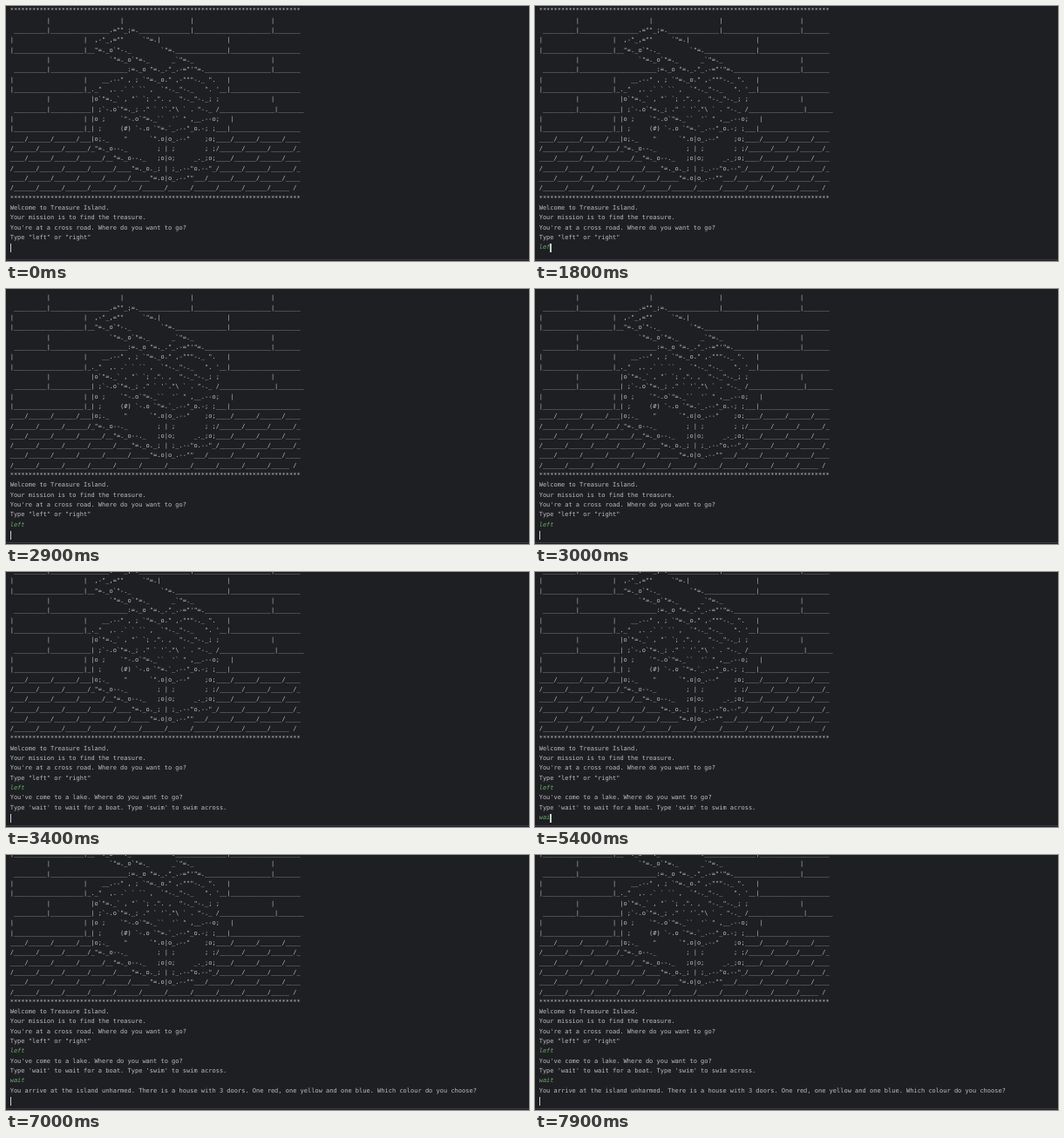
An HTML page for the animation above (8000 ms loop, 600x293 px).

```html
<!DOCTYPE html>
<html lang="en">
<head>
<meta charset="utf-8">
<title>Treasure Island</title>
<style>
  html, body { margin: 0; width: 100%; height: 100%; overflow: hidden; background: #1e1f22; }
  #stage { position: relative; width: 600px; height: 293px; overflow: hidden; }
  #console { position: absolute; left: 4.7px; top: 0.4px; }
  pre {
    margin: 0;
    font: 7px/11.33px "DejaVu Sans Mono", monospace;
    color: #bcbec4;
    text-rendering: geometricPrecision;
    font-variant-ligatures: none;
  }
  i { color: #6aab73; }
  #caret { position: absolute; width: 1.4px; height: 10px; background: #ced0d6; }
  #edge { position: absolute; left: 0; top: 291px; width: 600px; height: 1px; background: #393b40; }
</style>
</head>
<body>
<div id="stage">
  <div id="console">
<pre>
*******************************************************************************
          |                   |                  |                     |
 _________|________________.=""_;=.______________|_____________________|_______
|                   |  ,-"_,=""     `"=.|                  |
|___________________|__"=._o`"-._        `"=.______________|___________________
          |                `"=._o`"=._      _`"=._                     |
 _________|_____________________:=._o "=._."_.-="'"=.__________________|_______
|                   |    __.--" , ; `"=._o." ,-"""-._ ".   |
|___________________|_._"  ,. .` ` `` ,  `"-._"-._   ". '__|___________________
          |           |o`"=._` , "` `; .". ,  "-._"-._; ;              |
 _________|___________| ;`-.o`"=._; ." ` '`."\ ` . "-._ /_______________|_______
|                   | |o ;    `"-.o`"=._``  '` " ,__.--o;   |
|___________________|_| ;     (#) `-.o `"=.`_.--"_o.-; ;___|___________________
____/______/______/___|o;._    "      `".o|o_.--"    ;o;____/______/______/____
/______/______/______/_"=._o--._        ; | ;        ; ;/______/______/______/_
____/______/______/______/__"=._o--._   ;o|o;     _._;o;____/______/______/____
/______/______/______/______/____"=._o._; | ;_.--"o.--"_/______/______/______/_
____/______/______/______/______/_____"=.o|o_.--""___/______/______/______/____
/______/______/______/______/______/______/______/______/______/______/_____ /
*******************************************************************************
Welcome to Treasure Island.
Your mission is to find the treasure.
You're at a cross road. Where do you want to go?
Type "left" or "right"
</pre>
<pre id="session"></pre>
    <div id="caret"></div>
  </div>
  <div id="edge"></div>
</div>
<script>
  const LOOP = 8000;
  const INTRO_ROWS = 24;
  const ROW = 11.33;
  const CELL = 4.214;
  const LAST_ROW_TOP = 277.15;

  const lake = `You've come to a lake. Where do you want to go?
Type 'wait' to wait for a boat. Type 'swim' to swim across.
`;
  const house = "You arrive at the island unharmed. There is a house with 3 doors. " +
    "One red, one yellow and one blue. Which colour do you choose?\n";
  const answer = word => `<i>${word}</i>\n`;
  const atLake = answer("left") + lake;
  const atHouse = atLake + answer("wait") + house;

  // start time, finished lines, text being typed, caret shown
  const steps = [
    [0, "", "", true],
    [1800, "", "lef", true],
    [2000, "", "left", true],
    [2900, answer("left"), "", true],
    [3400, atLake, "", true],
    [4800, atLake, "", false],
    [5000, atLake, "wa", true],
    [5400, atLake, "wai", true],
    [5700, atLake, "wait", true],
    [7000, atHouse, "", true],
    [7800, atHouse, "", false],
    [7900, atHouse, "", true]
  ];

  const [board, session, caret] =
    ["console", "session", "caret"].map(id => document.getElementById(id));
  let shown;

  function show([, printed, typed, caretOn]) {
    const row = INTRO_ROWS + printed.split("\n").length - 1;
    session.innerHTML = `${printed}<i>${typed}</i>`;
    caret.style.left = `${typed.length * CELL}px`;
    caret.style.top = `${row * ROW + 0.6}px`;
    caret.style.visibility = caretOn ? "visible" : "hidden";
    board.style.top = `${Math.min(0.4, LAST_ROW_TOP - row * ROW)}px`;
  }

  function tick() {
    const time = performance.now() % LOOP;
    const step = steps.findLast(([start]) => start <= time);
    if (step !== shown) show(shown = step);
    requestAnimationFrame(tick);
  }
  tick();
</script>
</body>
</html>
```
